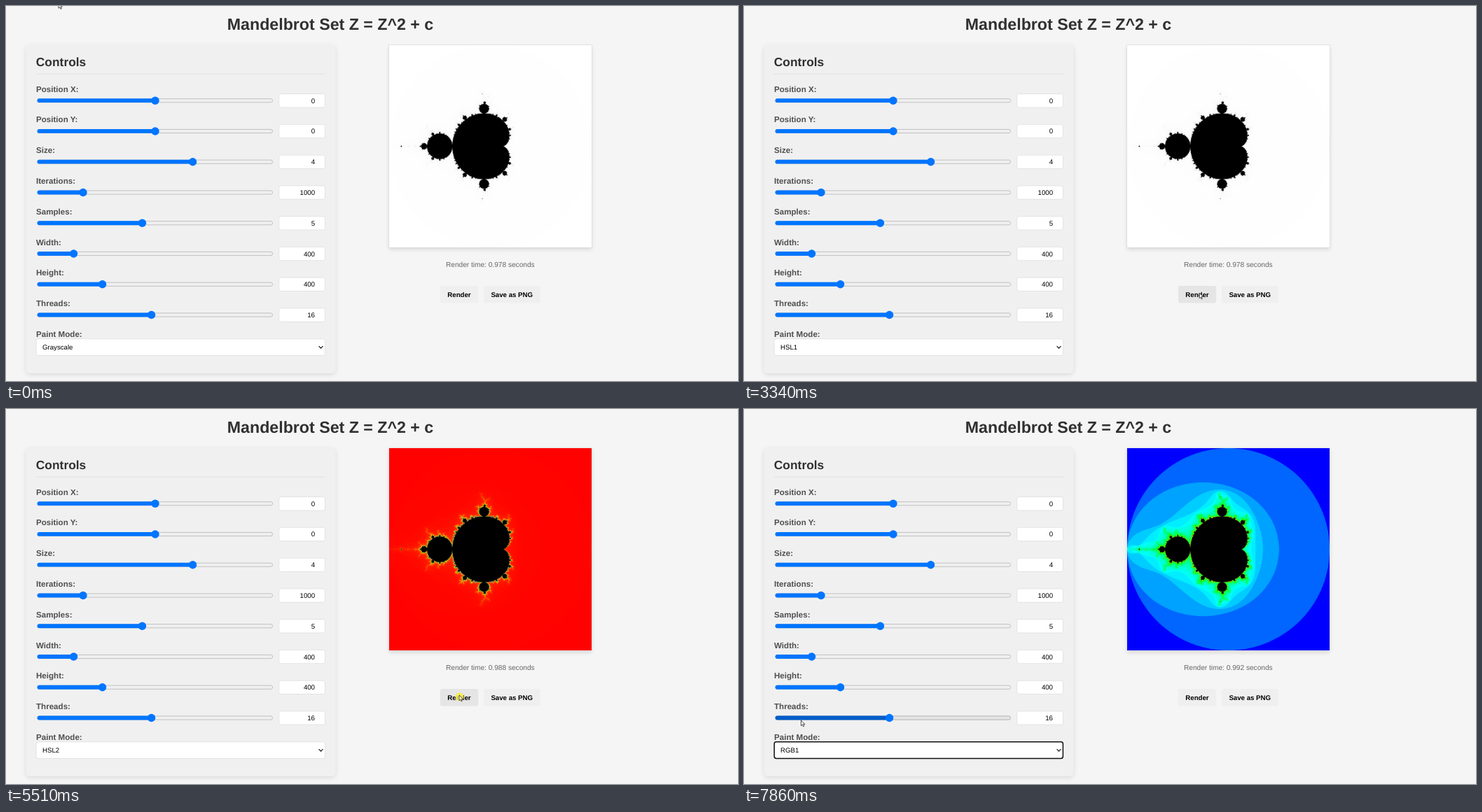
Animation, 1045 px wide and 536 px high, one loop 8 s. Source, as an HTML page with a canvas:

```html
<!DOCTYPE html>
<html lang="en">
<head>
<meta charset="utf-8">
<title>Mandelbrot Set</title>
<style>
html, body { margin: 0; width: 100%; height: 100%; overflow: hidden; background: #f5f5f5; }
svg { position: absolute; left: 0; top: 0; display: block; }
canvas {
  position: absolute; left: 546.6px; top: 55.5px; width: 289.8px; height: 289.8px;
  box-shadow: 0 0 0 .7px #ddd, 0 3px 6px rgba(0, 0, 0, .13);
}
text { font-family: "Liberation Sans", Arial, sans-serif; font-size: 9.67px; text-rendering: geometricPrecision; }
.head { font-weight: bold; fill: #303030; }
.label { font-weight: bold; font-size: 11.6px; fill: #4f4f4f; }
.btn { font-weight: bold; text-anchor: middle; }
.value { text-anchor: end; }
.box { fill: #fff; stroke: #ddd; stroke-width: .75; }
.panel { fill: #f0f0f0; filter: drop-shadow(0 2.5px 3px rgba(0, 0, 0, .11)); }
.track { fill: #efefef; stroke: #b2b2b2; stroke-width: .75; }
.bar, .thumb { fill: #0075ff; }
.hover .track { fill: #e5e5e5; stroke: #a0a0a0; }
.hover .bar { fill: #005cc8; }
.list { fill: #fff; stroke: #858585; stroke-width: .8; filter: drop-shadow(0 4px 6px rgba(0, 0, 0, .28)); }
.cursor { fill: #fff; stroke: #111; stroke-width: .7; stroke-linejoin: round; }
</style>
</head>
<body>
<svg id="ui" width="1045" height="536" viewBox="0 0 1045 536">
  <text class="head" x="315.8" y="34.3" font-size="23.2" style="font-size:23.2px">Mandelbrot Set Z = Z^2 + c</text>
  <rect class="panel" x="28.5" y="55.5" width="442" height="469.5" rx="5.8"/>
  <text class="head" x="42.8" y="85.6" style="font-size:17.4px">Controls</text>
  <path d="M43 97.2H455.5" stroke="#ddd" stroke-width=".8"/>
  <g id="rows"></g>
  <text class="label" x="43" y="472.8">Paint Mode:</text>
  <rect id="select" class="box" x="43.2" y="475.8" width="412.2" height="23.7" rx="2.9"/>
  <text id="mode" x="52" y="491"></text>
  <path d="M446.6 486.2l2.9 2.9 2.9-2.9" fill="none" stroke="#111" stroke-width="1.2"/>
  <text id="time" x="691.3" y="372.8" text-anchor="middle" fill="#666" style="font-size:10.15px"></text>
  <rect id="render" x="619.8" y="400" width="54.4" height="24.6" rx="2.9"/>
  <text class="btn" x="647" y="415.8">Render</text>
  <rect x="682" y="400" width="80.8" height="24.6" rx="2.9" fill="#efefef"/>
  <text class="btn" x="722.2" y="415.8">Save as PNG</text>
  <g id="popup">
    <rect class="list" x="43.4" y="295.2" width="412" height="180" rx="1"/>
    <rect id="pick" x="43.8" width="411.2" height="15" fill="#1967d2"/>
  </g>
  <circle id="dot" r="6" fill="#f5ec3c" fill-opacity=".85"/>
  <path id="arrow" class="cursor" d="M0 0V7.7L1.8 6.1L3 8.9L4.3 8.4L3.1 5.6H5.4Z"/>
  <path id="hand" class="cursor" d="M-1 6.4V.9a.9.9 0 0 1 1.8 0V4.4L4.4 5.1q1.2.3 1.2 1.5L5.1 9.6 4.3 11.6H.2L-2.7 7.6q-.6-1.2.4-1.5ZM2.2 4.8V6.2M3.8 5.1V6.4"/>
</svg>
<canvas id="view" width="400" height="400"></canvas>
<script>
const $ = id => document.getElementById(id);
const LOOP = 8000, MAX = 1000, N = 400;

function add(parent, tag, attrs, text) {
  const el = document.createElementNS("http://www.w3.org/2000/svg", tag);
  for (const k in attrs) el.setAttribute(k, attrs[k]);
  if (text !== undefined) el.textContent = text;
  return parent.appendChild(el);
}

// Sliders: name, value, thumb position
const rows = [
  ["Position X", 0, 213], ["Position Y", 0, 213], ["Size", 4, 266.6], ["Iterations", 1000, 110],
  ["Samples", 5, 194.5], ["Width", 400, 96.6], ["Height", 400, 137.6], ["Threads", 16, 207.6]
].map(([name, value, x], i) => {
  const y = 135.2 + i * 43.76, g = add($("rows"), "g", {});
  add(g, "text", { class: "label", x: 43, y: y - 12.5 }, name + ":");
  add(g, "rect", { class: "track", x: 45, y: y - 2.6, width: 335.6, height: 5.2, rx: 2.6 });
  add(g, "rect", { class: "bar", x: 44.6, y: y - 2.9, width: x - 44.6, height: 5.8, rx: 2.9 });
  add(g, "circle", { class: "thumb", cx: x, cy: y, r: 5.7 });
  add(g, "rect", { class: "box", x: 389.7, y: y - 9.6, width: 65.8, height: 19.4, rx: 2.9 });
  add(g, "text", { class: "value", x: 441, y: y + 3.5 }, value);
  return { g, y };
});

const modes = ["0", "1", "2", "3", "4", "5", "Grayscale", "HSL1", "HSL2", "HSL3", "RGB1", "FIRE"];
const items = modes.map((m, i) => add($("popup"), "text", { x: 52, y: 306 + i * 15 }, m));

// Fractal: escape counts once, then one colour ramp per paint mode
function hue(h) {
  const f = k => {
    const d = (k + h / 60) % 6;
    return 255 * (1 - Math.max(0, Math.min(d, 4 - d, 1)));
  };
  return [f(5), f(3), f(1)];
}

const ramps = [
  n => Array(3).fill(255 * (1 - n / MAX)),
  n => hue(Math.pow(360 * n / MAX, 1.5) % 360),
  n => hue(240 * (1 - Math.log(n) / Math.log(MAX)))
];

function escape(a, b) {
  const q = (a - .25) ** 2 + b * b;
  if (q * (q + a - .25) < b * b / 4 || (a + 1) ** 2 + b * b < .0625) return MAX;
  let x = 0, y = 0;
  for (let n = 1; n < MAX; n++) {
    const t = x * x - y * y + a;
    y = 2 * x * y + b;
    x = t;
    if (x * x + y * y > 4) return n;
  }
  return MAX;
}

const SAMPLES = 5;
const counts = new Uint16Array(N * N * SAMPLES);
for (let p = 0, k = 0; p < N * N; p++) {
  for (let s = 0; s < SAMPLES; s++) {
    const u = (s + .5) / SAMPLES, v = (s * 2 % SAMPLES + .5) / SAMPLES;
    counts[k++] = escape((p % N + u) * 4 / N - 2, (Math.floor(p / N) + v) * 4 / N - 2);
  }
}

const images = ramps.map(ramp => {
  const img = new ImageData(N, N), lut = [];
  for (let n = 0; n <= MAX; n++) lut.push(n > 0 && n < MAX ? ramp(n) : [0, 0, 0]);
  for (let p = 0; p < N * N; p++) {
    for (let c = 0; c < 3; c++) {
      let sum = 0;
      for (let s = 0; s < SAMPLES; s++) sum += lut[counts[p * SAMPLES + s]][c];
      img.data[p * 4 + c] = sum / SAMPLES;
    }
    img.data[p * 4 + 3] = 255;
  }
  return img;
});

// Pointer path: time, x, y
const path = [
  [0, 75, -4.5], [20, 75, -4.5], [670, 81, 485], [1080, 81, 485], [1580, 85, 406], [1660, 85, 406],
  [2020, 656, 385], [2180, 674, 400], [2340, 650, 410], [3650, 650, 410], [4050, 163.5, 482.3],
  [4160, 88, 482], [4250, 88, 482], [4430, 88, 412], [4500, 88, 421.5], [4560, 88, 424],
  [4740, 88, 424], [5180, 692, 414], [5420, 647, 409], [5610, 647, 409], [6030, 81, 487],
  [6200, 81, 487], [6260, 88, 488.3], [7230, 88, 488.3], [7520, 84, 453], [7760, 84, 453], [7850, 81.5, 445], [LOOP, 81.5, 445]
];
const clicks = [810, 1600, 2340, 4180, 4680, 5400, 6850, 7660];
const opened = [[830, 1640], [4220, 4730], [6880, 7690]];
const focused = [[1640, 2400], [4730, 5500], [7690, LOOP]];
const within = (t, spans) => spans.some(([a, b]) => t >= a && t < b);
const step = (t, ...at) => at.filter(a => t >= a).length;

function pointer(t) {
  const i = Math.max(1, path.findIndex(p => p[0] > t));
  const [t0, x0, y0] = path[i - 1], [t1, x1, y1] = path[i];
  const u = (t - t0) / (t1 - t0), e = u * u * (3 - 2 * u);
  return [x0 + (x1 - x0) * e, y0 + (y1 - y0) * e];
}

const show = (el, on) => el.setAttribute("visibility", on ? "visible" : "hidden");
const ctx = $("view").getContext("2d");
let shown = -1;

function draw(t) {
  const [x, y] = pointer(t);
  const open = within(t, opened);
  const busy = within(t, [[2400, 3350], [5500, 6580]]);
  const mode = [6, 7, 8, 10][step(t, 1640, 4730, 7690)];
  const image = step(t, 3350, 6580);

  if (image !== shown) {
    ctx.putImageData(images[image], 0, 0);
    $("time").textContent = `Render time: ${["0.978", "0.988", "0.992"][image]} seconds`;
    shown = image;
  }

  for (const r of rows) {
    const over = !open && !busy && x > 45 && x < 381 && Math.abs(y - r.y) < 5.8;
    r.g.setAttribute("class", over ? "hover" : "");
  }

  const ring = within(t, focused);
  $("select").style.stroke = ring ? "#101010" : "";
  $("select").style.strokeWidth = ring ? 1.5 : "";
  $("mode").textContent = modes[mode];

  const onButton = busy || (x > 620 && x < 674 && y > 400 && y < 425);
  $("render").setAttribute("fill", onButton ? "#e5e5e5" : "#efefef");

  show($("popup"), open);
  const row = y > 295 && y < 475 ? Math.floor((y - 295) / 15) : mode;
  $("pick").setAttribute("y", 295.2 + row * 15);
  items.forEach((el, i) => el.setAttribute("fill", i === row ? "#fff" : "#000"));

  show($("dot"), clicks.some(c => t >= c && t < c + 190));
  const hand = !busy && x > 43 && x < 456 && y > 475.5 && y < 500;
  show($("hand"), hand);
  show($("arrow"), !hand);
  for (const id of ["hand", "arrow"]) $(id).setAttribute("transform", `translate(${x} ${y})`);
  $("dot").setAttribute("transform", `translate(${x + .5} ${y + 2.5})`);
}

function tick() {
  draw(performance.now() % LOOP);
  requestAnimationFrame(tick);
}
tick();
</script>
</body>
</html>
```
